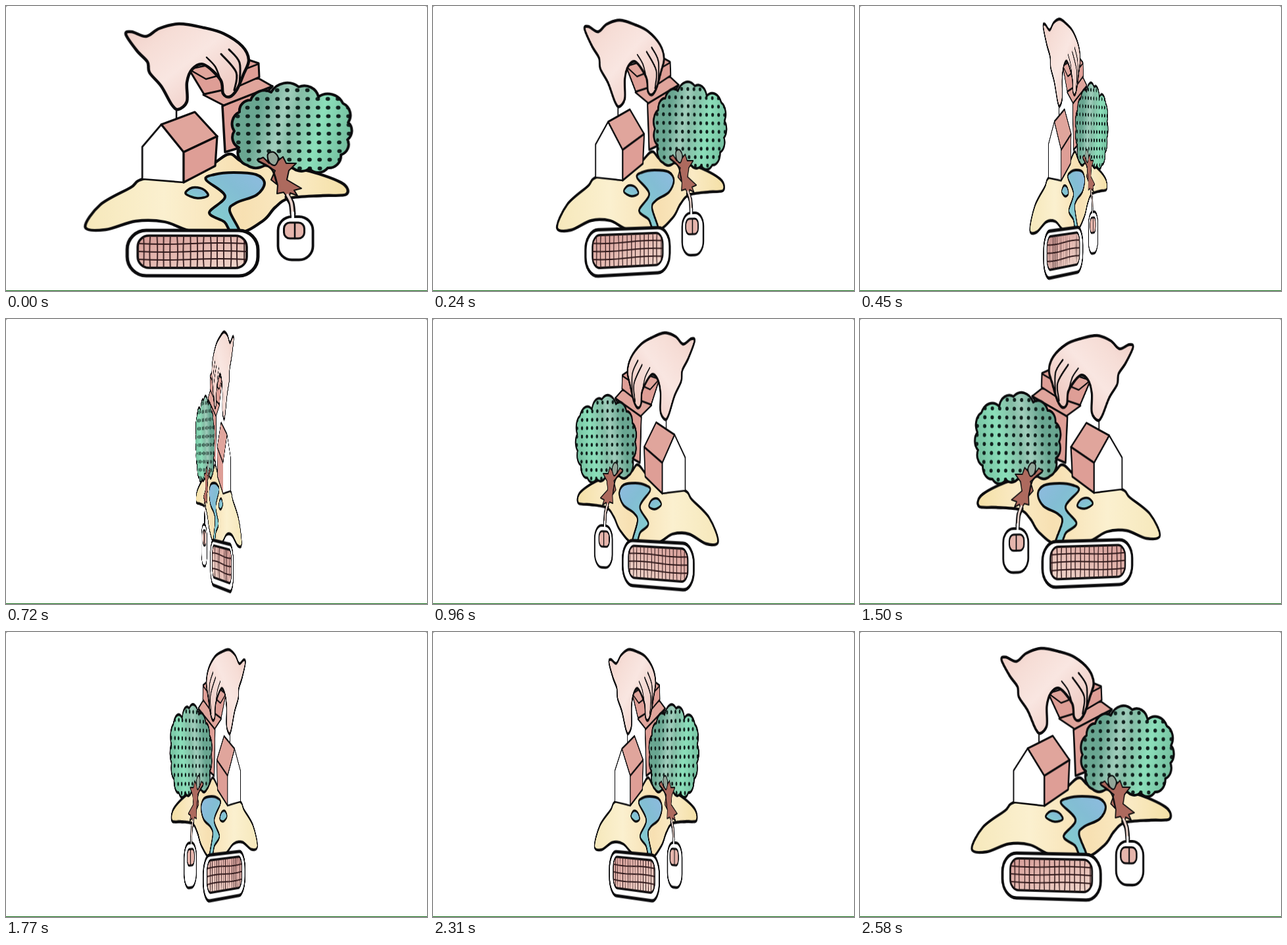
These frames come from a looping animation (640x433 px, 2610 ms). An HTML page:

```html
<!DOCTYPE html>
<html lang="en">
<head>
<meta charset="utf-8">
<title>Turning drawing</title>
<style>
html, body { margin: 0; width: 100%; height: 100%; overflow: hidden; background: #8a8a8a; }
#stage { position: absolute; left: 0; top: 0; width: 640px; height: 433px; overflow: hidden; background: #fff; border-radius: 3px 3px 0 0; }
#art { position: absolute; left: 0; top: 0; overflow: visible; transform-origin: 320px 216px; will-change: transform; filter: blur(.5px); }
#line { position: absolute; left: 0; right: 0; bottom: 0; height: 1.5px; background: #146b18; }
</style>
</head>
<body>
<div id="stage">
<svg id="art" width="640" height="433" viewBox="0 0 640 433" fill="none" stroke-linejoin="round" stroke-linecap="round">
  <defs>
    <linearGradient id="skin" x1="0" y1="0" x2="1" y2=".9">
      <stop offset="0" stop-color="#efcdc5"/><stop offset=".25" stop-color="#f6ddd6"/>
      <stop offset=".5" stop-color="#f9e6e1"/><stop offset="1" stop-color="#eabfb6"/>
    </linearGradient>
    <linearGradient id="leaf" x1="0" y1=".3" x2="1" y2=".5">
      <stop offset="0" stop-color="#69a590"/><stop offset=".22" stop-color="#69a691"/>
      <stop offset=".42" stop-color="#a0cdbb"/><stop offset=".52" stop-color="#85bda6"/>
      <stop offset=".74" stop-color="#8bdfba"/><stop offset="1" stop-color="#74bf9f"/>
    </linearGradient>
    <linearGradient id="sand" x1="0" y1="0" x2="1" y2="0">
      <stop offset="0" stop-color="#f6e8bb"/><stop offset=".3" stop-color="#fbf0cf"/>
      <stop offset=".6" stop-color="#f7e0b2"/><stop offset=".8" stop-color="#faeac4"/>
      <stop offset="1" stop-color="#f4e0a6"/>
    </linearGradient>
    <linearGradient id="water" x1="1" y1="0" x2=".2" y2="1">
      <stop offset="0" stop-color="#8fbbe0"/><stop offset=".4" stop-color="#83bdd4"/>
      <stop offset="1" stop-color="#84cfce"/>
    </linearGradient>
    <linearGradient id="keys" x1="0" y1="0" x2="1" y2="1">
      <stop offset="0" stop-color="#d69c97"/><stop offset=".5" stop-color="#e5bab2"/>
      <stop offset="1" stop-color="#f0d8cd"/>
    </linearGradient>
    <clipPath id="crown"></clipPath>
    <clipPath id="pad"><rect x="199" y="349" width="166" height="49" rx="17"/></clipPath>
  </defs>
</svg>
<div id="line"></div>
</div>
<script>
const art = document.getElementById('art');
const INK = '#0b0b0d', PINK = '#de9e96', ROOF = '#e0a59c';

function add(tag, attrs, parent = art) {
  const el = document.createElementNS('http://www.w3.org/2000/svg', tag);
  for (const k in attrs) el.setAttribute(k, attrs[k]);
  parent.appendChild(el);
  return el;
}

const pairs = s => s.trim().split(/\s+/).map(p => p.split(',').map(Number));

// Smooth path through key points
function curve(text, closed) {
  const p = pairs(text), n = p.length;
  const at = i => closed ? p[(i + n) % n] : p[Math.max(0, Math.min(n - 1, i))];
  let d = 'M' + p[0];
  for (let i = 0; i < (closed ? n : n - 1); i++) {
    const [a, b, c, e] = [at(i - 1), at(i), at(i + 1), at(i + 2)];
    const c1 = [0, 1].map(j => b[j] + (c[j] - a[j]) / 6);
    const c2 = [0, 1].map(j => c[j] - (e[j] - b[j]) / 6);
    d += `C${c1} ${c2} ${c}`;
  }
  return d + (closed ? 'Z' : '');
}

// Closed outline of arcs that bulge between notches
function scallop(text) {
  const p = pairs(text);
  return 'M' + p[0] + p.map((a, i) => {
    const b = p[(i + 1) % p.length], r = Math.hypot(b[0] - a[0], b[1] - a[1]) * .66;
    return `A${r} ${r} 0 0 1 ${b}`;
  }).join('') + 'Z';
}

const shape = (d, fill, width, ink = INK) =>
  add('path', { d, fill, stroke: width ? ink : 'none', 'stroke-width': width });
const blob = (pts, fill, w) => shape(curve(pts, true), fill, w);
const stroke = (pts, w, ink) => shape(curve(pts), 'none', w, ink);
const poly = (pts, fill, w) => shape('M' + pts + 'Z', fill, w);
const box = (x, y, width, height, rx, fill, w) =>
  add('rect', { x, y, width, height, rx, fill, stroke: INK, 'stroke-width': w });

function land() {
  blob(`119,336 142,302 188,276 210,262 300,246 338,225 365,239 447,248 508,268 516,286
    480,288 430,292 408,306 390,326 350,346 284,343 240,328 196,327 150,340`, 'url(#sand)', 4.3);
}

function tower() {
  poly('258,158 284,138 303,136 330,150 333,223 318,212 286,162', '#fff', 0);
  poly('328,152 382,126 404,122 350,180 352,216 332,222', PINK, 3.5);
  poly('299,135 350,114 383,110 404,122 330,151', ROOF, 3);
  poly('277,96 368,82 383,87 384,108 350,123 300,134', PINK, 3);
  poly('277,96 315,88 350,98 303,111', ROOF, 2.5);
  stroke('352,100 383,88', 2.5);
  stroke('258,157 258,171', 2.5);
}

function hand() {
  blob(`181,43 190,39 212,46 232,34 262,27 300,33 330,42 358,61 368,82 360,104 350,127 339,138
    329,133 325,112 300,89 282,96 274,116 274,145 261,157 251,150 235,122 217,101 214,85 198,68`,
    'url(#skin)', 4.5);
  stroke('326,73 349,101 346,128', 3);
  stroke('338,66 354,86 354,118', 3);
  stroke('304,78 317,92 325,112', 2.5);
}

function tree() {
  const d = scallop(`366,242 353,215 346,190 354,161 371,143 402,131 444,123 474,138 511,148
    519,177 518,203 508,226 488,246 460,247 430,240 400,233`);
  shape(d, 'url(#leaf)', 0);
  add('path', { d }, document.getElementById('crown'));
  const g = add('g', { 'clip-path': 'url(#crown)', fill: '#10211d' });
  for (let r = 0; r < 10; r++)
    for (let c = 0; c < 12; c++)
      add('ellipse', { cx: 350 + c * 15.3 + r * .4, cy: 128 + r * 13.2, rx: 3.4, ry: 3 }, g);
  shape(d, 'none', 4);
}

function trunk() {
  poly(`381,234 390,230 399,239 404,226 409,238 420,229 425,239 440,239 429,250 426,264 448,277
    437,280 442,288 431,284 429,294 421,283 411,285 412,272 402,264 408,250`, '#ad6a5e', 2);
  blob('397,225 406,222 413,231 408,242 399,237', '#93a79a', 2.2);
  stroke('383,236 403,248 411,270', 3);
}

function lake() {
  blob(`303,264 316,256 345,253 379,256 392,269 380,287 349,299 339,311 354,342
    340,342 331,328 308,314 332,289`, 'url(#water)', 4);
  blob('272,285 282,276 298,278 306,288 290,292', 'url(#water)', 3.5);
}

function house() {
  poly('235,180 206,214 206,263 269,268 269,222', '#fff', 2.7);
  poly('235,180 286,161 320,198 269,222', ROOF, 3.2);
  poly('269,222 320,198 317,243 269,268', PINK, 3.2);
}

function keyboard() {
  box(183, 341, 199, 69, 29, '#fff', 5);
  box(199, 349, 166, 49, 17, 'url(#keys)', 3.5);
  const g = add('g', { 'clip-path': 'url(#pad)', stroke: '#30191b', 'stroke-width': 1.8 });
  for (let y = 361; y < 390; y += 12)
    add('path', { d: `M199 ${y}Q240 ${y + 2} 282 ${y}T365 ${y}` }, g);
  for (let x = 208; x < 365; x += 10.2)
    add('path', { d: `M${x} 349q${2 * Math.sin(x)} 24 0 49` }, g);
}

function mouse() {
  stroke('427,290 433,300 435,316', 9);
  stroke('427,287 433,300 435,322', 4, '#ead4cc');
  box(412.5, 320, 53, 65.5, 21, '#fff', 3.8);
  stroke('435,314 435,322', 4, '#fff');
  box(421.5, 329, 31, 24, 9, '#e5b5ac', 3);
  stroke('438,330 438,353', 2.5);
}

[land, tower, hand, tree, trunk, lake, house, keyboard, mouse].forEach(draw => draw());

const LOOP = 2610, STEP = 30, WIDTH = 1.045;

// A quick flick past the front, then two slow sweeps with a cut behind
function angle(t) {
  if (t < 60) return -17 + .85 * t;
  if (t < 1410) {
    const u = (t - 60) / 1320;
    return 34 + 121 * u + 5 * Math.sin(Math.PI * u);
  }
  const u = (t - 1410) / 1170;
  return 220 + 96.4 * u + 2.3 * Math.sin(2 * Math.PI * u);
}

function render(ms) {
  const t = Math.floor((ms % LOOP) / STEP) * STEP;
  const a = angle(t) * Math.PI / 180;
  const s = WIDTH * Math.cos(a), k = 36e-5 * Math.sin(a) ** 3;
  const dx = 1 - 2.5 * (t / LOOP) ** 4, dy = -Math.min(3.5, t / 40);
  const m = [s + dx * k, dy * k, 0, k, 0, 1, 0, 0, 0, 0, 1, 0, dx, dy, 0, 1];
  art.style.transform = `matrix3d(${m.map(v => v.toFixed(7))})`;
}

const start = performance.now();
function tick(now) {
  render(Math.max(0, now - start));
  requestAnimationFrame(tick);
}
render(0);
requestAnimationFrame(tick);
</script>
</body>
</html>
```
